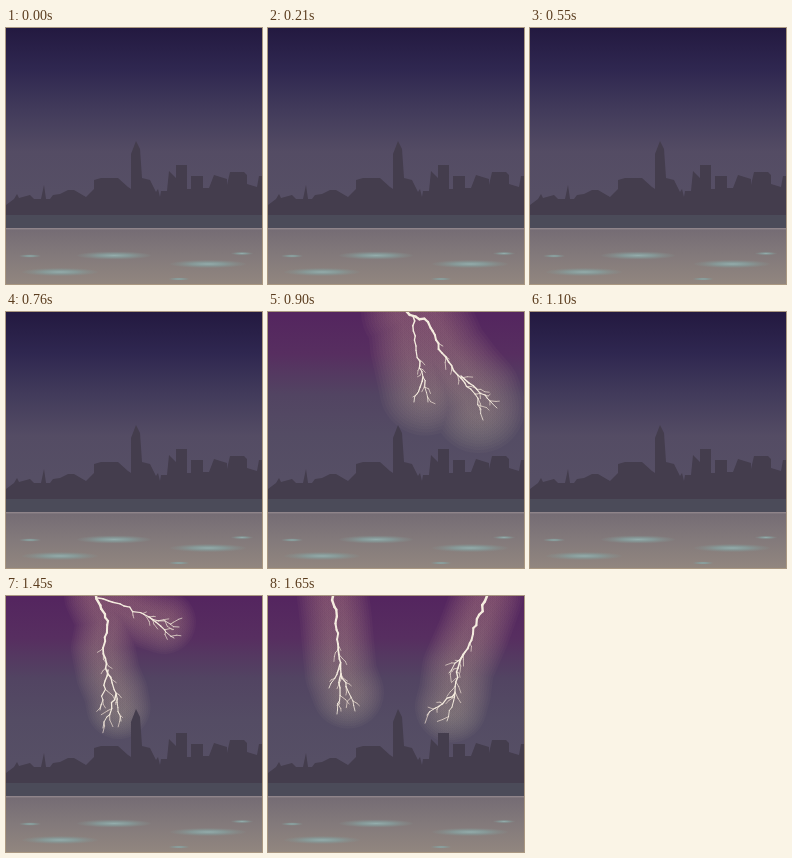
Write an HTML page that moves like this. It is 256x256 px and loops after 1850 ms.

```html
<!DOCTYPE html>
<html lang="en">
<head>
<meta charset="utf-8">
<title>Lightning over a city</title>
<style>
  html, body { margin: 0; width: 100%; height: 100%; overflow: hidden; background: #251a42; }
  svg { display: block; width: 100vw; height: 100vh; }
</style>
</head>
<body>
<svg viewBox="0 0 256 256">
  <defs>
    <linearGradient id="ground" x1="0" y1="0" x2="0" y2="1">
      <stop offset="0" stop-color="#756c74"/>
      <stop offset=".5" stop-color="#837a7b"/>
      <stop offset="1" stop-color="#91867f"/>
    </linearGradient>
    <radialGradient id="puddle">
      <stop offset="0" stop-color="#94adac"/>
      <stop offset=".45" stop-color="#86a09f" stop-opacity=".75"/>
      <stop offset="1" stop-color="#84918f" stop-opacity=".1"/>
    </radialGradient>
    <linearGradient id="glow" gradientUnits="userSpaceOnUse" x1="0" y1="0" x2="0" y2="130">
      <stop offset="0" stop-color="#9b6a78"/>
      <stop offset="1" stop-color="#988e87"/>
    </linearGradient>
  </defs>
  <g id="scenes"></g>
  <path fill="#443d4d" d="M0 188V177L8 171 11 166 13 170 24 167 28 171H35L38 157 40 171H44L47 167 54 166 62 162H68L80 169 88 161V152L95 150H112L122 159 125 161V126L130 113 134 121 136 150 144 152 150 164 152 161 154 169 155 163H161L163 143 170 150V137H181V161H185V148H197V160H203L208 147 221 151V157L224 144H238L241 147V156L251 159 253 148H256V188Z"/>
  <rect y="187" width="256" height="14" fill="#4b4b59"/>
  <rect y="201" width="256" height="55" fill="url(#ground)"/>
  <rect y="200" width="256" height="1.4" fill="#8f848a"/>
  <g fill="url(#puddle)">
    <ellipse cx="108" cy="227.5" rx="37" ry="4"/>
    <ellipse cx="54" cy="244" rx="38" ry="4"/>
    <ellipse cx="202" cy="236" rx="38" ry="4"/>
    <ellipse cx="24" cy="228" rx="11" ry="1.7"/>
    <ellipse cx="236" cy="225.5" rx="11" ry="1.7"/>
    <ellipse cx="173" cy="251" rx="11" ry="1.5"/>
  </g>
</svg>
<script>
const NS = 'http://www.w3.org/2000/svg';
const root = document.getElementById('scenes');
const HORIZON = ['#544c64', '#564f65'];

// Only the upper sky changes colour; near the horizon all skies agree.
const skies = {
  dark: ['#231940', '#2f2750', '#423b5b'],
  violet: ['#6c3485', '#633777', '#594868'],
  plum: ['#54255f', '#572e60', '#524462']
};

// Each bolt is a trunk and its main arms, as a few points from root to tip.
const storms = [
  { sky: 'violet', reach: 46, bolts: [
    ['42,0 56,30 53,58 58,84 66,106 73,139', '66,106 60,122 55,145', '54,62 53,98 51,130', '62,91 76,108']
  ] },
  { sky: 'plum', reach: 46, bolts: [
    ['139,0 160,10 174,41 193,66 207,82 215,108', '145,4 148,34 155,65 160,90', '155,65 146,90', '193,64 217,83 229,96']
  ] },
  { sky: 'plum', reach: 32, bolts: [
    ['90,0 102,25 97,52 102,78 110,97 115,125', '92,2 118,10 143,21 173,31', '102,74 94,114', '110,98 97,132', '143,21 168,42']
  ] },
  { sky: 'plum', reach: 36, bolts: [
    ['65,0 68,24 70,48 73,78 87,115', '72,68 61,92', '73,78 69,118'],
    ['219,0 205,38 190,72 187,96 179,125', '197,56 181,77', '187,97 159,119']
  ] }
];

function add(parent, tag, attrs) {
  const el = document.createElementNS(NS, tag);
  for (const key in attrs) el.setAttribute(key, attrs[key]);
  return parent.appendChild(el);
}

function rng(seed) {
  return () => (seed = (seed * 16807) % 2147483647) / 2147483647;
}

const parse = text => text.split(' ').map(p => p.split(',').map(Number));
const toPath = pts => 'M' + pts.map(p => p.join(' ')).join('L');

// Break each span into short steps, shifted at random.
function jag(pts, rand) {
  const out = [pts[0]];
  for (let i = 1; i < pts.length; i++) {
    const [ax, ay] = pts[i - 1], [bx, by] = pts[i];
    const n = Math.max(2, Math.round(Math.hypot(bx - ax, by - ay) / 5));
    for (let k = 1; k <= n; k++) {
      const shift = k < n ? 3 : 0;
      out.push([
        ax + (bx - ax) * k / n + (rand() - .5) * shift,
        ay + (by - ay) * k / n + (rand() - .5) * shift
      ]);
    }
  }
  return out;
}

function drawArm(g, pts, width, color) {
  for (let i = 1; i < pts.length; i++) {
    add(g, 'path', {
      d: toPath([pts[i - 1], pts[i]]),
      stroke: color,
      'stroke-width': .7 + width * (1 - i / pts.length)
    });
  }
}

// Grow side twigs along the lower part, leaning with the direction of the arm.
function drawTwigs(g, pts, rand) {
  for (let i = Math.ceil(pts.length * .35); i < pts.length - 1; i++) {
    if (rand() < .35) continue;
    const [x, y] = pts[i], [px, py] = pts[i - 2] || pts[0];
    const side = i % 2 ? 1 : -1;
    const angle = Math.atan2(y - py, x - px) + side * (.4 + rand() * .5);
    const size = 5 + rand() * 8;
    const tip = [x + Math.cos(angle) * size, y + Math.sin(angle) * size];
    drawArm(g, jag([[x, y], tip], rand), .3, '#ddcfc6');
  }
}

// Stack round strokes of shrinking width so that light builds up towards the bolt.
function drawGlow(g, arms, reach) {
  const d = arms.filter(([[, y]]) => y < 10).map(pts => {
    const [a, b] = pts.slice(-2);
    const end = [(a[0] + b[0]) / 2, (a[1] + b[1]) / 2];
    return toPath([...pts.slice(0, -1), end]);
  }).join('');
  const layers = 12;
  for (let i = 0; i < layers; i++) {
    add(g, 'path', {
      d, stroke: 'url(#glow)', 'stroke-opacity': .07,
      'stroke-width': 2 * reach * (1 - .8 * i / layers)
    });
  }
}

function makeScene({ sky, reach, bolts = [] }, index) {
  const g = add(root, 'g', { fill: 'none', 'stroke-linecap': 'round', 'stroke-linejoin': 'round' });
  add(g, 'rect', { width: 256, height: 190, fill: `url(#${sky})` });
  const rand = rng(71 + index * 131);
  const shapes = bolts.map(arms => arms.map(parse));
  shapes.forEach(arms => drawGlow(g, arms, reach));
  shapes.forEach(arms => arms.forEach((arm, i) => {
    const pts = jag(arm, rand);
    drawTwigs(g, pts, rand);
    drawArm(g, pts, i ? .9 : 1.9, '#f5ecdf');
  }));
  return g;
}

for (const id in skies) {
  const grad = add(document.querySelector('defs'), 'linearGradient', { id, x1: 0, y1: 0, x2: 0, y2: 1 });
  [...skies[id], ...HORIZON].forEach((color, i) =>
    add(grad, 'stop', { offset: i * .217, 'stop-color': color }));
}

const scenes = [{ sky: 'dark' }, ...storms].map(makeScene);

// [end time in ms, scene]
const steps = [[350, 0], [550, 1], [900, 0], [1100, 2], [1450, 0], [1650, 3], [1850, 4]];

function show(now) {
  const t = now % 1850;
  const current = steps.find(([end]) => t < end)[1];
  scenes.forEach((g, i) => g.setAttribute('visibility', i === current ? 'visible' : 'hidden'));
}

const start = performance.now();
function tick(now) {
  show(Math.max(0, now - start));
  requestAnimationFrame(tick);
}
show(0);
requestAnimationFrame(tick);
</script>
</body>
</html>
```
